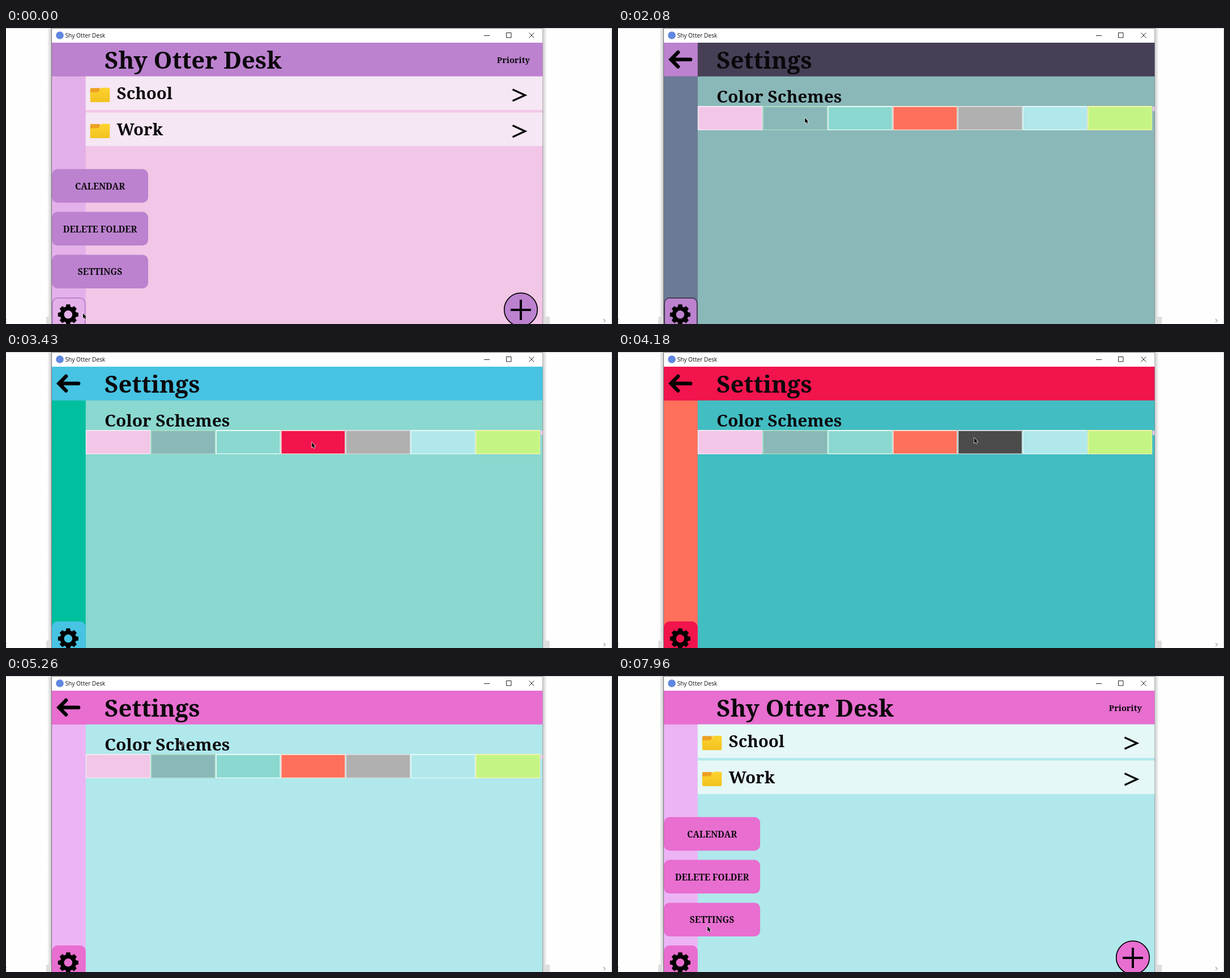
An HTML page with a canvas for the animation above (8000 ms loop, 1070 by 524 pixels).

```html
<!DOCTYPE html>
<html lang="en">
<head>
<meta charset="utf-8">
<title>Shy Otter Desk</title>
<style>
html, body { margin: 0; width: 100%; height: 100%; overflow: hidden; background: #fff; }
canvas { display: block; }
</style>
</head>
<body>
<canvas id="stage" width="1070" height="524"></canvas>
<script>
const ctx = document.getElementById('stage').getContext('2d');
const LOOP = 8000;
const APP_NAME = 'Shy Otter Desk';
const SERIF = '"Noto Serif", serif';

const schemes = [
  { header: '#bc82cf', side: '#e4b0e9', bg: '#f2c6e7', row: '#f5e7f4' },
  { header: '#473f56', side: '#6b7a95', bg: '#8ab8b8' },
  { header: '#47c3e3', side: '#00bf9e', bg: '#8ad8d0' },
  { header: '#f1144d', side: '#ff705c', bg: '#42bdc2' },
  { header: '#4b4b4b', side: '#7a7a7a', bg: '#b0b0b0' },
  { header: '#e86ed0', side: '#ecb4f5', bg: '#b0e8ec', row: '#e5f8f7' }
];
const swatches = [
  ['#f2c6e7', '#f5e7f4'], ['#8ab8b8', '#a9dcc3'], ['#8ad8d0', '#eafbf2'],
  ['#ff705c', '#f8e0d4'], ['#b0b0b0', '#dadada'], ['#b0e8ec', '#e5f8f7'],
  ['#c4f584', '#f6f2a4']
];

// A scheme is picked at `at`, the buttons follow at `settled`,
// and hover returns when the pointer moves again at `moved`.
const picks = [
  { at: 0, settled: 0, moved: 0 },
  { at: 2080, settled: 2110, moved: 2290 },
  { at: 2720, settled: 2780, moved: 2840 },
  { at: 3490, settled: 3550, moved: 3730 },
  { at: 4240, settled: 4300, moved: 4360 },
  { at: 4800, settled: 4860, moved: 4930 }
];

// time, x, y
const pointerPath = [
  [0, 136, 505], [40, 136, 505], [200, 150, 462], [360, 162, 438],
  [1380, 162, 438], [1700, 255, 285], [2000, 330, 159],
  [2290, 330, 159], [2520, 381, 156], [2840, 381, 156], [3400, 540, 160],
  [3730, 540, 160], [3940, 625, 155], [4090, 625, 155], [4180, 629, 152],
  [4360, 629, 152], [4720, 770, 162], [4930, 770, 162], [5020, 690, 180],
  [5260, 308, 114], [5500, 115, 66], [5660, 104, 70], [6240, 104, 70],
  [6320, 84, 110], [6460, 48, 260], [6620, 72, 430], [6800, 101, 515],
  [7320, 101, 515], [7380, 102, 518], [7810, 102, 518], [7960, 158, 443]
];

function pointerAt(t) {
  const next = pointerPath.findIndex(p => p[0] > t);
  if (next === 0) return pointerPath[0].slice(1);
  if (next < 0) return pointerPath[pointerPath.length - 1].slice(1);
  const [t0, x0, y0] = pointerPath[next - 1];
  const [t1, x1, y1] = pointerPath[next];
  const k = (t - t0) / (t1 - t0);
  return [x0 + (x1 - x0) * k, y0 + (y1 - y0) * k];
}

const inside = ([px, py], x, y, w, h) => px >= x && px < x + w && py >= y && py < y + h;

function rect(x, y, w, h, fill) {
  ctx.fillStyle = fill;
  ctx.fillRect(x, y, w, h);
}

function roundRect(x, y, w, h, r, fill) {
  ctx.fillStyle = fill;
  ctx.beginPath();
  ctx.roundRect(x, y, w, h, r);
  ctx.fill();
}

function circle(x, y, r, fill) {
  ctx.fillStyle = fill;
  ctx.beginPath();
  ctx.arc(x, y, r, 0, 2 * Math.PI);
  ctx.fill();
}

function line(path, width, color = '#000', cap = 'butt') {
  ctx.strokeStyle = color;
  ctx.lineWidth = width;
  ctx.lineCap = cap;
  ctx.stroke(new Path2D(path));
}

function fillPath(path, fill) {
  ctx.fillStyle = fill;
  ctx.fill(new Path2D(path));
}

function text(string, x, y, size, align = 'left') {
  ctx.font = `bold ${size}px ${SERIF}`;
  ctx.textAlign = align;
  ctx.fillStyle = '#0b080c';
  ctx.fillText(string, x, y);
}

function shadow(x0, x1) {
  const fade = ctx.createLinearGradient(x0, 0, x1, 0);
  fade.addColorStop(0, '#cccccc');
  fade.addColorStop(1, '#fefefe');
  rect(Math.min(x0, x1), 1, Math.abs(x1 - x0), 523, fade);
}

function drawDesktop() {
  rect(0, 0, 1070, 524, '#fefefe');
  shadow(80, 73);
  shadow(948, 955);
  rect(71, 511, 9, 13, '#dedede');
  rect(949, 511, 11, 13, '#dedede');
  line('M0 .5H1070M1069.5 0V524', 1, '#cfcfcf');
  line('M1 515l-3 3 3 3M1055 515l3.5 3-3.5 3', 1, '#777');
  rect(80, 0, 868, 524, '#77727a');
  rect(81, 1, 866.5, 25, '#fff');
  circle(95, 13, 6.8, '#5f86e0');
  ctx.font = '10.2px "Open Sans", sans-serif';
  ctx.textAlign = 'left';
  ctx.fillStyle = '#111';
  ctx.fillText(APP_NAME, 104.5, 17);
  line('M844 13.5h10M883.5 8.5h8.5v8.5h-8.5zM923.5 8.5l9 9M932.5 8.5l-9 9', 1, '#222');
}

function drawGear(x, y) {
  ctx.save();
  ctx.translate(x, y);
  ctx.strokeStyle = '#000';
  ctx.lineWidth = 7;
  ctx.beginPath();
  ctx.arc(0, 0, 10.8, 0, 2 * Math.PI);
  ctx.stroke();
  for (let i = 0; i < 8; i++) {
    fillPath('M-4.4 -12L-3.4 -18H3.4L4.4 -12Z', '#000');
    ctx.rotate(Math.PI / 4);
  }
  ctx.restore();
}

function drawButton(x, y, w, h, outer, inner) {
  roundRect(x, y, w, h, 10, outer);
  if (inner !== outer) roundRect(x + 2, y + 2, w - 4, h - 4, 8, inner);
}

function drawRow(label, y, fill) {
  rect(140.7, y, 807, 59.5, fill);
  ctx.save();
  ctx.translate(148.7, y + 18.5);
  fillPath('M0 4Q0 2 2 2H16L20 6V14H0Z', '#eda022');
  const shade = ctx.createLinearGradient(0, 2, 0, 27);
  shade.addColorStop(0, '#fdd32f');
  shade.addColorStop(1, '#f2c21f');
  fillPath('M0 11Q0 9.5 2 9.5H13Q15 9.5 16 7L18 3Q19 1.5 21 1.5H32.5Q34.5 1.5 34.5 3.5V25Q34.5 27 32.5 27H2Q0 27 0 25Z', shade);
  ctx.restore();
  text(label, 195.5, y + 40.5, 29.4);
  line(`M894.5 ${y + 23}L916.5 ${y + 33.2}L894.5 ${y + 43.4}`, 3.3);
}

function drawHome(t, scheme, hoverPoint) {
  text(APP_NAME, 174, 72, 41.8);
  text('Priority', 925, 62, 14.6, 'right');
  drawRow('School', 85.7, scheme.row);
  drawRow('Work', 149.6, scheme.row);
  circle(909, 498.5, 29.3, scheme.header);
  ctx.strokeStyle = '#000';
  ctx.lineWidth = 1.7;
  ctx.stroke();
  line('M891 499h36M909 481v36', 4);

  if (t < 820 || t >= 7810) {
    ['CALENDAR', 'DELETE FOLDER', 'SETTINGS'].forEach((label, i) => {
      const y = 249.8 + 75.8 * i;
      const hovered = inside(hoverPoint, 81, y, 170, 59.5);
      drawButton(81, y, 170, 59.5, scheme.header, hovered ? scheme.side : scheme.header);
      text(label, 166, y + 36, 15.4, 'center');
    });
  }
}

function drawSettings(t, scheme, buttonColor, pick, hoverPoint) {
  const onBack = inside(hoverPoint, 81, 26, 60, 60);
  rect(81, 26, 59.7, 59.7, onBack ? scheme.side : buttonColor);
  line('M128 55.7H94M106 43L93.5 55.7L106 68.5', 6.5, '#000', 'round');
  text('Settings', 174, 72, 41.8);
  text('Color Schemes', 174, 131.5, 29.8);
  rect(944, 139, 4, 8, '#f2c6e7');
  const hoverAllowed = t >= pick.moved;
  swatches.forEach(([fill, border], i) => {
    const x = 140.8 + 114.7 * i;
    const hovered = hoverAllowed && schemes[i] && inside(hoverPoint, x, 138, 114.7, 43);
    rect(x, 138, 114.2, 43, border);
    rect(x + 1.7, 140, 111.5, 39.7, hovered ? schemes[i].header : fill);
  });
}

function drawPointer([x, y]) {
  ctx.save();
  ctx.translate(x, y);
  const arrow = 'M0 0V9L2 7.2L3.4 10.4L5 9.7L3.6 6.7H6.2Z';
  line(arrow, 1.2, '#fff');
  fillPath(arrow, '#000');
  ctx.restore();
}

function draw(t) {
  const index = picks.filter(p => t >= p.at).length - 1;
  const pick = picks[index];
  const scheme = schemes[index];
  const buttonColor = t < pick.settled ? schemes[index - 1].header : scheme.header;
  const atHome = t < 820 || t >= 5850;
  const hoverPoint = pointerAt(t - 60);

  drawDesktop();
  ctx.save();
  ctx.beginPath();
  ctx.rect(81, 26, 866.5, 498);
  ctx.clip();
  rect(81, 26, 867, 498, scheme.bg);
  rect(81, 26, 59.7, 498, scheme.side);
  rect(81, 26, 867, 59.7, scheme.header);
  if (atHome) drawHome(t, scheme, hoverPoint);
  else drawSettings(t, scheme, buttonColor, pick, hoverPoint);

  const gearPressed = t >= 7080 && t < 7140;
  const gearHovered = !gearPressed && inside(hoverPoint, 81, 477, 60, 60);
  drawButton(81, 477, 59.7, 60, scheme.header, gearHovered ? scheme.side : buttonColor);
  drawGear(109.8, 507.3);
  ctx.restore();
  drawPointer(pointerAt(t));
}

function tick() {
  draw(performance.now() % LOOP);
  requestAnimationFrame(tick);
}
tick();
</script>
</body>
</html>
```
